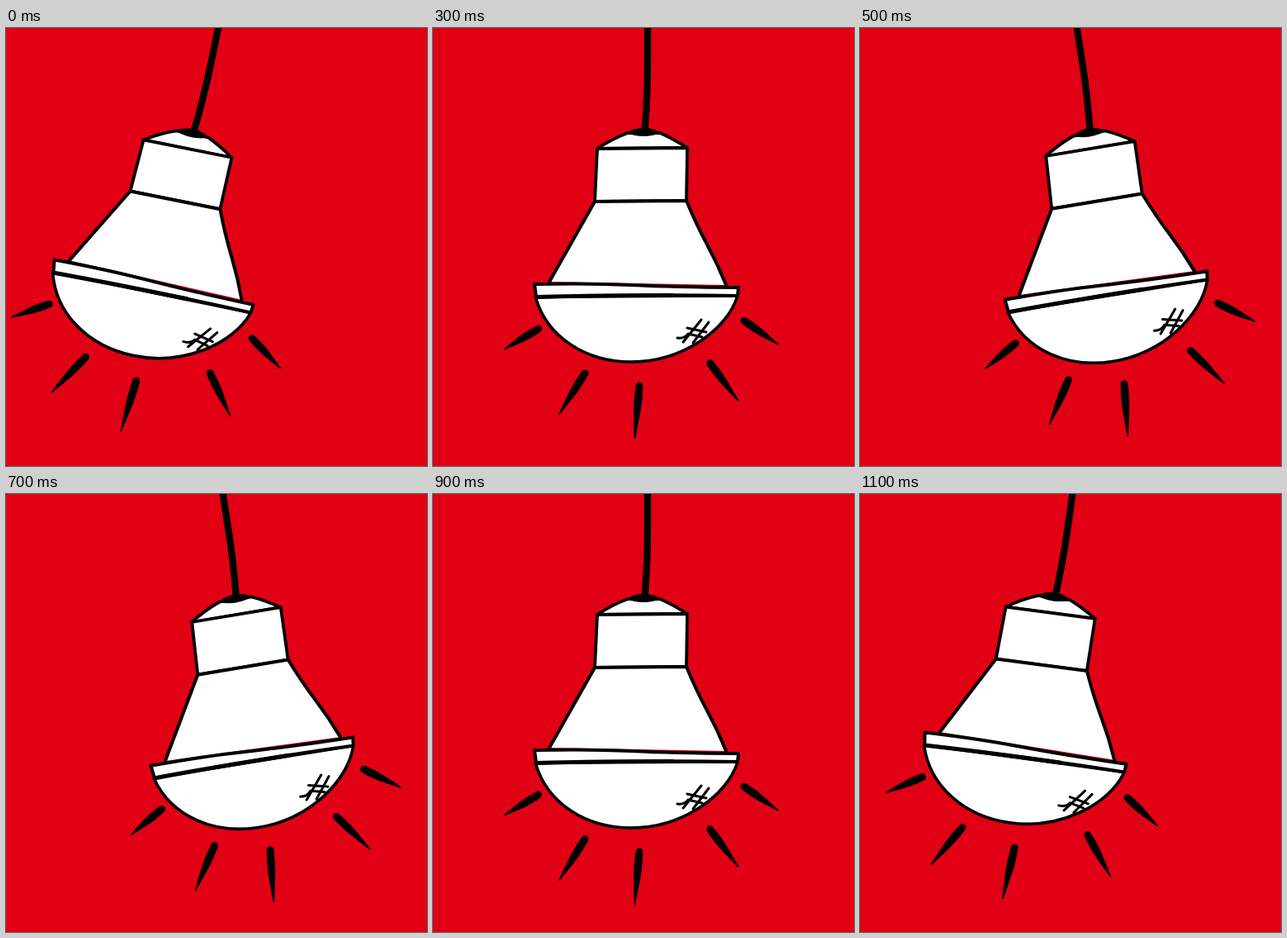
Animation of 510 by 530 pixels, one loop 1200 ms. Source, as an HTML page with a canvas:

```html
<!DOCTYPE html>
<html lang="en">
<head>
<meta charset="utf-8">
<title>Swinging lamp</title>
<style>
html, body { margin: 0; width: 510px; height: 530px; overflow: hidden; background: #e10014; }
canvas { display: block; }
</style>
</head>
<body>
<canvas id="stage" width="510" height="530"></canvas>
<script>
const ctx = document.getElementById('stage').getContext('2d');
const RED = '#e10014', INK = '#000', WHITE = '#fff';
const STEP = 100;
const PIVOT = { x: 261, y: -15 };
const RAD = Math.PI / 180;

// Key angles of one swing, left to right; the way back mirrors them.
const SWING = [11.8, 8, 5, 0, -4.5, -8.9, -11.8];

function shape(d, width, fill) {
  const path = new Path2D(d);
  if (fill) {
    ctx.fillStyle = fill;
    ctx.fill(path);
  }
  if (width) {
    ctx.lineWidth = width;
    ctx.stroke(path);
  }
}

// A brush stroke that starts on an ellipse around the dome, longest when it points down.
function ray(place, aim) {
  const r = 4.4, len = 32 + 32 * Math.sin(aim * RAD);
  ctx.save();
  ctx.translate(250 + 136 * Math.cos(place * RAD), 310 + 123 * Math.sin(place * RAD));
  ctx.rotate(aim * RAD);
  ctx.beginPath();
  ctx.arc(0, 0, r, Math.PI / 2, Math.PI * 1.5);
  ctx.bezierCurveTo(len * 0.4, -r * 1.3, len * 0.55, -r * 0.8, len, -0.8);
  ctx.lineTo(len, 0.8);
  ctx.bezierCurveTo(len * 0.55, r * 0.8, len * 0.4, r * 1.3, 0, r);
  ctx.fillStyle = INK;
  ctx.fill();
  ctx.restore();
}

function lamp() {
  // cord
  shape('M260 -60 V40 Q260 82 256.5 125', 8.3);

  // cap and neck
  shape('M199 146 Q217 134 236 127 H275 Q291 134 308 145 Z', 3.8, WHITE);
  shape('M234 127 Q256 114 276 127 Q255 135 234 127 Z', 0, INK);
  shape('M199 146 L196 210 L307 209 L308 145 Z', 3.8, WHITE);

  // cone
  shape('M141 307 L196 210 L307 209 Q319 238 332 262 T355 311', 4, WHITE);

  // dome
  shape('M124 325 C138 375 186 404 240 404 C301 404 356 366 369 324 Z', 3.6, WHITE);

  // rim
  shape('M123 310 Q190 308.5 240 311 T370 314 L369 324 Q290 322.5 200 324 L125 325.5 Z', 4, WHITE);
  shape('M127 325.5 Q200 323.5 290 323.5', 5);

  // glint
  shape('M325 353 L303 380 M334 356 L315 381 M308 363 L331 368 M296 375 Q305 376 309 370 L326 374', 3);

  // rays
  ray(154, 149);
  ray(119, 122);
  ray(90, 95);
  ray(51, 53);
  ray(21, 35);
}

function draw(ms) {
  const last = SWING.length - 1;
  const n = Math.floor(ms / STEP) % (last * 2);
  const angle = SWING[last - Math.abs(last - n)];
  const sag = 6 * Math.abs(angle / 12) ** 5;

  ctx.fillStyle = RED;
  ctx.fillRect(0, 0, 510, 530);
  ctx.save();
  ctx.translate(PIVOT.x - angle * 0.07, PIVOT.y + sag);
  ctx.rotate(angle * RAD);
  ctx.translate(-PIVOT.x, -PIVOT.y);
  ctx.strokeStyle = INK;
  ctx.lineCap = ctx.lineJoin = 'round';
  lamp();
  ctx.restore();
}

let start;
function tick(now) {
  start ??= now;
  draw(now - start);
  requestAnimationFrame(tick);
}
draw(0);
requestAnimationFrame(tick);
</script>
</body>
</html>
```
